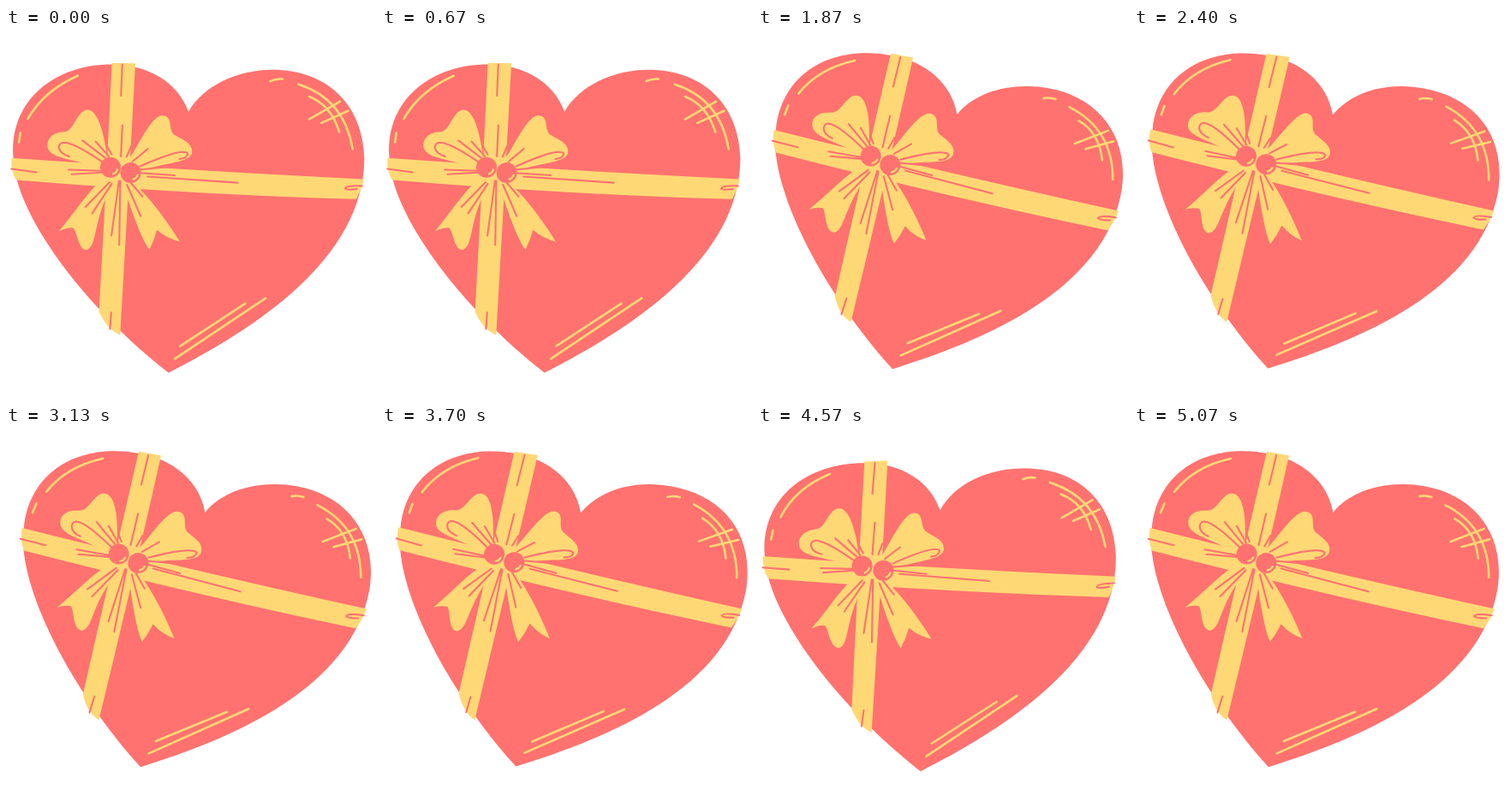
Write an HTML page with a canvas that moves like this. It is 432 px wide and 432 px high and loops after 5.11 s.

```html
<!DOCTYPE html>
<html lang="en">
<head>
<meta charset="utf-8">
<title>Heart gift box</title>
<style>
  html, body { margin: 0; width: 100%; height: 100%; overflow: hidden; background: #fff; }
  canvas { display: block; width: 432px; height: 432px; }
</style>
</head>
<body>
<canvas id="stage" width="432" height="432"></canvas>
<script>
const ctx = document.getElementById('stage').getContext('2d');
const PINK = '#ff726f', YELLOW = '#ffd876';
const LOOP = 5110, PHASES = 8, TILT = Math.PI / 18;
const KNOT = { x: 134, y: 167 };
let phase = 0;

const HEART = `M213,98 C200,62 165,44 128,43 C62,41 4,80 8,150 C9,215 90,325 190,403
  C290,352 418,270 418,152 C416,85 370,49 312,49 C270,49 230,67 213,98Z`;

const RIBBONS = [
  'M124,41 L151,41 Q145,160 133,358 Q118,352 109,331 Q118,160 124,41Z',
  'M6,152 Q200,166 418,176 Q415,190 409,200 Q230,195 12,178 Q5,166 6,152Z'
];

const LOOPS = [
  'M119,160 C116,128 108,96 95,96 C82,96 80,120 68,121 C52,122 46,132 49,141 C54,154 80,152 115,166Z',
  'M140,160 C156,134 170,102 182,102 C196,102 188,120 198,125 C208,131 217,134 217,144 C216,157 190,156 155,167Z'
];

const TAILS = [
  'M120,172 C100,184 88,206 62,237 Q72,232 78,233 C83,238 84,258 94,259 C108,256 100,225 126,180Z',
  'M143,176 Q170,197 203,249 Q188,246 176,236 Q173,248 167,259 Q156,245 136,180Z'
];

const CREASES = `M113,157 Q62,122 62,140 Q63,147 74,150 M157,161 Q206,139 212,146 Q211,152 202,153
  M136,43 L134,79 M136,113 L134,150 M123,332 L121,351 M6,165 L36,168
  M165,173 L270,181 M416,184 Q396,184 396,188 Q398,190 410,188`;

const SHINES = `M26,106 Q44,73 84,56 M15,133 L17,122 M309,62 Q315,59 323,60
  M341,66 Q395,83 405,141 M354,80 Q380,90 389,121 M354,107 L390,86 M368,111 L399,97
  M203,371 L279,322 M197,386 L303,315`;

// Small hand-drawn wobble that differs from drawing to drawing.
function wobble(x, y) {
  const s = phase * 2.3;
  return [
    x + 0.45 * Math.sin(x * 0.06 + y * 0.09 + s),
    y + 0.45 * Math.sin(x * 0.1 - y * 0.05 + s * 1.7)
  ];
}

function sketch(d) {
  return new Path2D(d.replace(/(\d+),(\d+)/g, (_, x, y) => wobble(+x, +y).join()));
}

function fill(d, color) {
  ctx.fillStyle = color;
  ctx.fill(sketch(d));
}

function stroke(d, color, width) {
  ctx.strokeStyle = color;
  ctx.lineWidth = width;
  ctx.stroke(sketch(d));
}

// Two or three creases spreading from the knot, angles in degrees.
function fan(count, from, to, reachFrom, reachTo, inner = 22) {
  ctx.beginPath();
  for (let i = 0; i < count; i++) {
    const k = i / (count - 1);
    const angle = (from + (to - from) * k) * Math.PI / 180;
    const reach = reachFrom + (reachTo - reachFrom) * k;
    for (const r of [inner, reach]) {
      const p = wobble(KNOT.x + r * Math.cos(angle), KNOT.y + r * Math.sin(angle));
      r === inner ? ctx.moveTo(...p) : ctx.lineTo(...p);
    }
  }
  ctx.stroke();
}

function berry(x, y) {
  const [cx, cy] = wobble(x, y);
  ctx.beginPath();
  ctx.arc(cx, cy, 12, 0, Math.PI * 2);
  ctx.fillStyle = PINK;
  ctx.fill();
  ctx.beginPath();
  ctx.arc(cx, cy, 8.5, 0.3, 1.2);
  ctx.strokeStyle = YELLOW;
  ctx.lineWidth = 2.2;
  ctx.stroke();
}

function drawBow() {
  [...LOOPS, ...TAILS].forEach(d => fill(d, YELLOW));
  stroke(CREASES, PINK, 2.1);
  fan(3, 219, 240, 57, 33);
  fan(2, 292, 321, 32, 41, 18);
  fan(2, 176, 181, 58, 61);
  fan(2, 124, 134, 60, 59, 18);
  fan(2, 91, 98, 86, 76, 12);
  fan(2, 50, 66, 39, 58, 18);
  fan(2, -5, 5, 62, 63);
  berry(122, 163);
  berry(146, 169);
}

function draw() {
  ctx.setTransform(1, 0, 0, 1, 0, 0);
  ctx.fillStyle = '#fff';
  ctx.fillRect(0, 0, 432, 432);
  if (phase >= PHASES / 2) {
    ctx.translate(39.7, -32.2);
    ctx.rotate(TILT);
  }
  ctx.lineCap = ctx.lineJoin = 'round';
  fill(HEART, PINK);
  stroke(SHINES, YELLOW, 2.6);
  RIBBONS.forEach(d => fill(d, YELLOW));
  drawBow();
}

// 12.5 drawings per second, shown on a 30 Hz grid.
function frame() {
  const tick = Math.floor((performance.now() % LOOP + 4) * 0.03);
  phase = Math.floor(tick / 2.4 + 1e-6) % PHASES;
  draw();
  requestAnimationFrame(frame);
}
frame();
</script>
</body>
</html>
```
